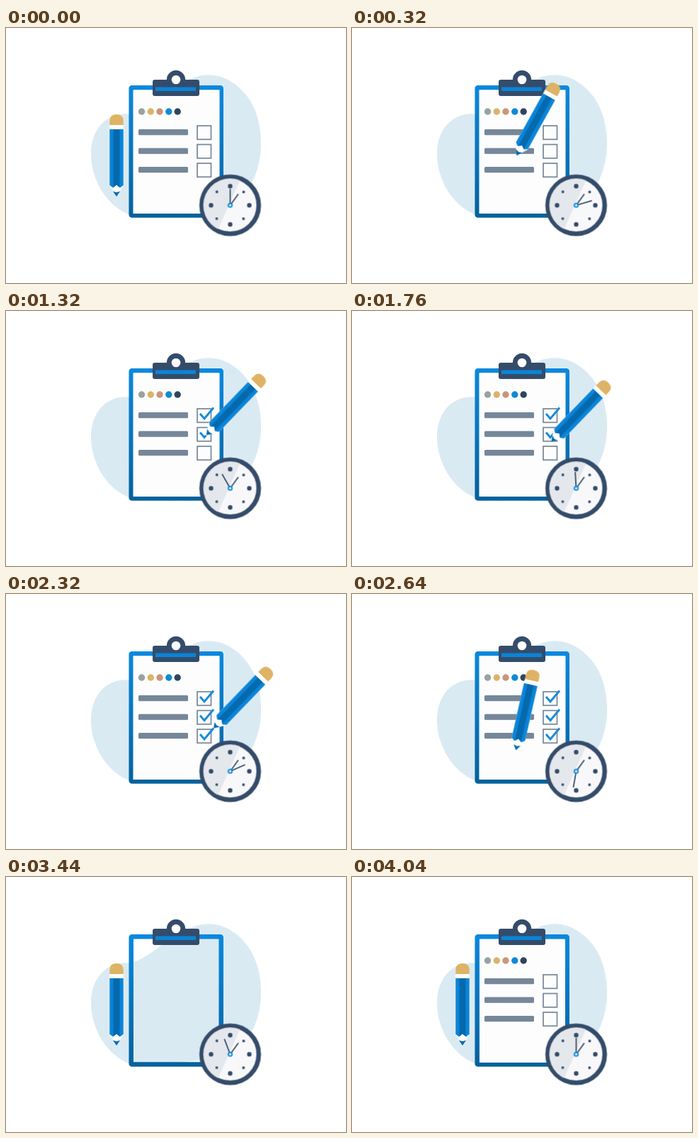
An HTML page that plays this animation: 480 by 360 pixels, repeating every 5 s.

```html
<!DOCTYPE html>
<html lang="en">
<head>
<meta charset="utf-8">
<title>Checklist</title>
<style>
  html, body { margin: 0; width: 100%; height: 100%; overflow: hidden; background: #fff; }
  svg { display: block; width: 100%; height: 100%; }

  .navy { fill: #344c6a; }
  .blue { fill: #0a84d8; }
  .deep { fill: #0569ad; }
  .slate { fill: #758799; }
  .box { fill: none; stroke: #758799; stroke-width: 1.7; }
  .check {
    fill: none; stroke: #188cda; stroke-width: 3;
    stroke-dasharray: 1 2; stroke-dashoffset: 1.02;
  }
  .hand { stroke: #2f4864; stroke-width: 1.7; stroke-linecap: round; }

  .check, .move, .turn, .old, .new { animation: 5s linear infinite; }
  .c1 { animation-name: check1; }
  .c2 { animation-name: check2; }
  .c3 { animation-name: check3; }
  .move { animation-name: move; }
  .turn { animation-name: turn; }
  .old { animation-name: slide-out; }
  .new { animation-name: slide-in; }
  .minute { animation: minute 5s infinite; }

  @keyframes check1 { 0%, 10.8% { stroke-dashoffset: 1.02; } 14.4%, 100% { stroke-dashoffset: 0; } }
  @keyframes check2 { 0%, 24.8% { stroke-dashoffset: 1.02; } 28.4%, 100% { stroke-dashoffset: 0; } }
  @keyframes check3 { 0%, 40.4% { stroke-dashoffset: 1.02; } 44%, 100% { stroke-dashoffset: 0; } }

  /* the tip traces each tick: start, corner, end */
  @keyframes move {
    0% { transform: translate(156px, 180px); animation-timing-function: ease-in-out; }
    10.8% { transform: translate(314.3px, 103.3px); }
    11.9% { transform: translate(320.3px, 110.3px); }
    14.4% { transform: translate(333.3px, 94.8px); animation-timing-function: ease-in-out; }
    24.8% { transform: translate(314.3px, 129.8px); }
    25.9% { transform: translate(320.3px, 136.8px); }
    28.4% { transform: translate(333.3px, 121.3px); animation-timing-function: ease-in-out; }
    40.4% { transform: translate(314.3px, 156.3px); }
    41.5% { transform: translate(320.3px, 163.3px); }
    44%, 46.4% { transform: translate(333.3px, 147.8px); animation-timing-function: ease-in-out; }
    59.2%, 100% { transform: translate(156px, 180px); }
  }
  @keyframes turn {
    0% { transform: rotate(0deg); animation-timing-function: ease-in-out; }
    10.8%, 46.4% { transform: rotate(44deg); animation-timing-function: cubic-bezier(.3, .2, .45, 1); }
    59.2%, 100% { transform: rotate(0deg); }
  }
  @keyframes minute {
    0%, 40.4% { animation-timing-function: cubic-bezier(.7, 0, .6, 1); }
    0% { transform: rotate(0deg); }
    40.4% { transform: rotate(360deg); }
    80.8%, 100% { transform: rotate(720deg); }
  }
  @keyframes slide-out {
    0%, 58.4% { transform: translateY(0); opacity: 1; animation-timing-function: ease-in; }
    68.8%, 100% { transform: translateY(110px); opacity: 0; }
    64% { opacity: 1; }
  }
  @keyframes slide-in {
    0%, 68.8% { transform: translateY(-180px); animation-timing-function: ease-out; }
    79.2%, 100% { transform: translateY(0); }
  }
</style>
</head>
<body>
<svg viewBox="0 0 480 360">
  <defs>
    <linearGradient id="edge" x1="0" y1="0" x2="0" y2="1">
      <stop offset="0" stop-color="#0a88de"/>
      <stop offset="1" stop-color="#04629d"/>
    </linearGradient>
    <clipPath id="inside"><rect x="180" y="88" width="121" height="174"/></clipPath>
    <clipPath id="dial"><circle r="38"/></clipPath>
    <g id="sheet">
      <rect x="179.5" y="87.5" width="122" height="174.5" fill="#fdfdfd"/>
      <g>
        <circle cx="191.5" cy="118" r="4.7" fill="#98a29f"/>
        <circle cx="204.3" cy="118" r="4.7" fill="#dbb36a"/>
        <circle cx="217" cy="118" r="4.7" fill="#c8967a"/>
        <circle cx="229.8" cy="118" r="4.7" fill="#0f8ad6"/>
        <circle cx="242.2" cy="118" r="4.7" fill="#2d4560"/>
      </g>
      <g id="row">
        <rect class="slate" x="187" y="143" width="70" height="8.3" rx="1.5"/>
        <rect class="box" x="270" y="138" width="19.5" height="19.3"/>
      </g>
      <use href="#row" y="26.5"/>
      <use href="#row" y="53"/>
    </g>
  </defs>

  <path fill="#daeaf3" d="M173 121.500C200 119 225 84 268 69C300 59 326 77 341 97C355 116 361 143 360 168C359 194 350 222 330 240L290 258L205 264L173 263C141 250 120 213 120 178C120 143 142 119 173 121.500Z"/>

  <rect x="176.700" y="84.300" width="127" height="180.300" rx="1" fill="none" stroke="url(#edge)" stroke-width="6.500" stroke-linejoin="round"/>

  <g clip-path="url(#inside)"><use class="new" href="#sheet"/></g>
  <g class="old">
    <use href="#sheet"/>
    <path class="check c1" pathLength="1" d="M274 145l6 7l13-15.500"/>
    <path class="check c2" pathLength="1" d="M274 171.500l6 7l13-15.500"/>
    <path class="check c3" pathLength="1" d="M274 198l6 7l13-15.500"/>
  </g>

  <g class="navy">
    <circle cx="240" cy="73" r="13.200"/>
    <rect x="207" y="73" width="66" height="23" rx="3"/>
  </g>
  <circle cx="240" cy="73" r="6.300" fill="#fff"/>
  <rect class="blue" x="211" y="83.500" width="57" height="5.500" rx=".5"/>

  <g transform="translate(316.500 250.300)">
    <circle r="40.300" fill="#f8f8fa" stroke="#344c6a" stroke-width="6.500"/>
    <path clip-path="url(#dial)" fill="#e4e7ec" d="M16-40L-20 40H-45V-40Z"/>
    <g class="navy">
      <g id="marks">
        <circle cy="-27" r="3.200"/>
        <circle cx="19" cy="-18.800" r="1.900"/>
      </g>
      <use href="#marks" transform="rotate(90)"/>
      <use href="#marks" transform="rotate(180)"/>
      <use href="#marks" transform="rotate(270)"/>
    </g>
    <line class="hand" x2="11" y2="-15.300"/>
    <line class="hand minute" y2="-22.500"/>
    <circle r="2.600" fill="#fff" stroke="#118bd8" stroke-width="2"/>
  </g>

  <g class="move"><g class="turn">
    <path fill="#fff" d="M-9.700-44H9.700V43L0 58L-9.700 43Z"/>
    <path fill="#deb365" d="M-9.700-43V-49Q-9.700-58 0-58T9.700-49V-43Z"/>
    <path class="blue" d="M-9.700-37H9.700V42L5 45.500L0 41.500L-5 45.500L-9.700 42Z"/>
    <path class="deep" d="M-4.500-37H4.500V45L0 41.500L-4.500 45Z"/>
    <path class="deep" d="M-5 50.500L0 52L5 50.500L0 58Z"/>
  </g></g>
</svg>
</body>
</html>
```
